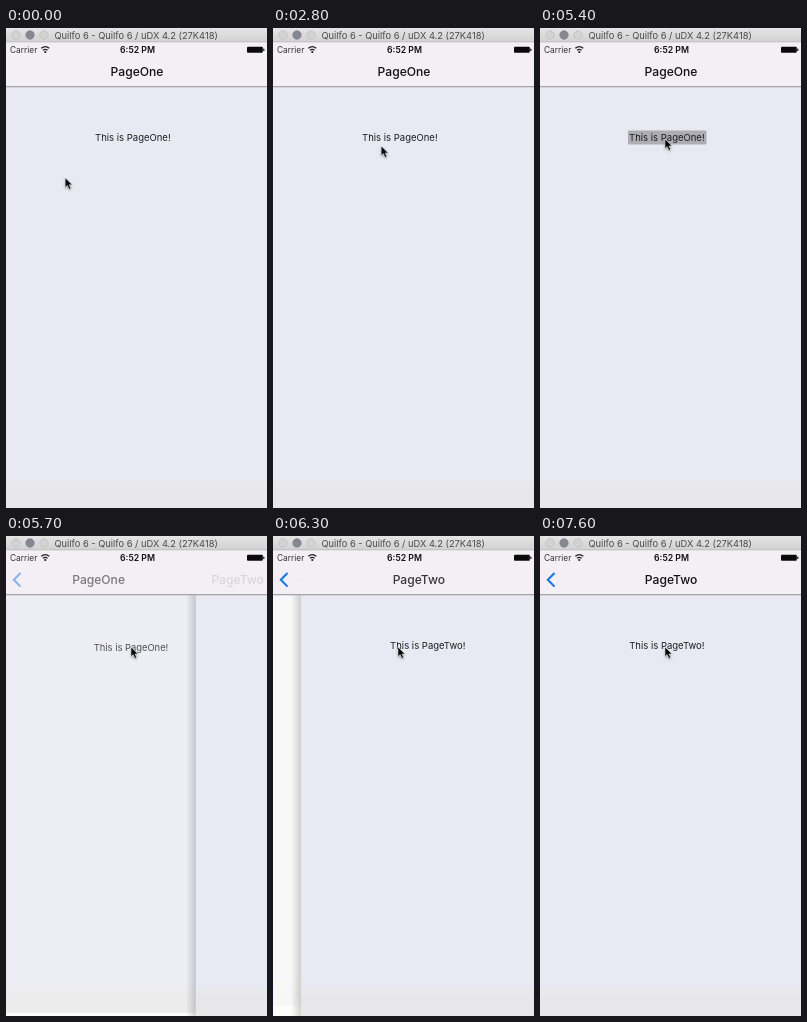
Recreate the animation shown at these times as an HTML page. Size 261 by 480 pixels, loop 8000 ms.

```html
<!DOCTYPE html>
<html lang="en">
<head>
<meta charset="utf-8">
<title>Page push</title>
<style>
  html, body { margin: 0; height: 100%; overflow: hidden; background: #fdfdfb; }
  svg { display: block; width: 100vw; height: 100vh; font-family: Inter, Roboto, sans-serif; }
  .label { font-size: 9.5px; fill: #1c1c20; }
  .title { font-size: 12.1px; font-weight: 500; text-anchor: middle; fill: #111; }
  #cursor { filter: drop-shadow(0 1px 1px rgba(0, 0, 0, .35)); }
</style>
</head>
<body>
<svg viewBox="0 0 261 480" preserveAspectRatio="none">
  <defs>
    <linearGradient id="chrome" x2="0" y2="1">
      <stop stop-color="#e6e5e6"/><stop offset="1" stop-color="#d2d1d2"/>
    </linearGradient>
    <linearGradient id="shade">
      <stop stop-color="#000" stop-opacity="0"/><stop offset="1" stop-color="#000" stop-opacity=".17"/>
    </linearGradient>
    <g id="sheet">
      <rect y="14" width="261" height="466" fill="#e9e9f3"/>
      <rect y="452" width="261" height="8" fill="#e9e9ec"/>
      <rect y="460" width="261" height="20" fill="#e7e7e9"/>
    </g>
  </defs>

  <rect width="261" height="480" fill="#fdfdfb"/>
  <g id="one">
    <use href="#sheet"/>
    <rect id="press" x="88" y="102.5" width="78.5" height="14" rx="1" fill="#adadb3"/>
    <text class="label" x="89" y="113">This is PageOne!</text>
  </g>
  <g id="two">
    <rect x="-10" y="59" width="10" height="421" fill="url(#shade)"/>
    <use href="#sheet"/>
    <text class="label" x="89" y="113">This is PageTwo!</text>
  </g>

  <rect y="14" width="261" height="44" fill="#f3eff4"/>
  <rect y="58" width="261" height="1.3" fill="#a6a5a9"/>
  <text id="titleOne" class="title" x="131" y="47.6">PageOne</text>
  <text id="titleTwo" class="title" x="131" y="47.6">PageTwo</text>
  <path id="back" d="M14.5 37 7.8 43.8l6.700 6.800" fill="none" stroke="#0f74f6" stroke-width="2"/>

  <text x="4" y="24.700" font-size="8.4" fill="#333">Carrier</text>
  <g fill="none" stroke="#222" stroke-width="1.2">
    <path d="M35.300 20.300Q39.300 16.800 43.300 20.300M37 22.300Q39.300 20.300 41.600 22.300"/>
    <circle cx="39.300" cy="24" r=".5"/>
  </g>
  <text x="131.500" y="24.700" font-size="8.7" font-weight="600" text-anchor="middle" fill="#111">6:52 PM</text>
  <rect x="241" y="18.800" width="15.800" height="6" rx="1" fill="#0a0a0a"/>
  <rect x="257.200" y="20.600" width="1.200" height="2.400" rx=".5" fill="#0a0a0a"/>

  <rect width="261" height="14" fill="url(#chrome)"/>
  <rect y="13.500" width="261" height=".8" fill="#b9b8ba"/>
  <g fill="#d4d3d4" stroke="#bfbebf" stroke-width=".7">
    <circle cx="10" cy="7" r="4.200"/>
    <circle cx="24" cy="7" r="4.200" fill="#858891" stroke="#7b7e87"/>
    <circle cx="38" cy="7" r="4.200"/>
  </g>
  <text x="48.500" y="10.700" font-size="9.3" fill="#4a4a4a">Quilfo 6 - Quilfo 6 / uDX 4.2 (27K418)</text>

  <path id="cursor" d="M0 0V9.600L2.200 7.600 3.900 11.400 5.600 10.600 4 7H7Z" fill="#050505" stroke="#f4f4f6" stroke-width=".5"/>
</svg>
<script>
const $ = id => document.getElementById(id);
const LOOP = 8000, STEP = 100, W = 261;

// time, x, y of the pointer tip
const path = [
  [0, 59.2, 149.8], [1300, 59.2, 149.8], [1800, 70.8, 136], [2200, 90.2, 125],
  [3100, 117.2, 114.5], [3600, 121.2, 112], [3700, 121.2, 112], [4000, 125, 111], [LOOP, 125, 111]
];

function pointer(t) {
  const i = path.findIndex(k => k[0] > t);
  const [t0, x0, y0] = path[i - 1], [t1, x1, y1] = path[i];
  const f = (t - t0) / (t1 - t0);
  return [x0 + (x1 - x0) * f, y0 + (y1 - y0) * f];
}

// critically damped spring from 0 to 1
function spring(t) {
  if (t < 5600) return 0;
  const u = (t - 5479) * 0.004625;
  return 1 - (1 + u) * Math.exp(-u);
}

function place(id, transform, opacity = 1) {
  $(id).setAttribute('transform', transform);
  $(id).setAttribute('opacity', opacity);
}

function draw(t) {
  const p = spring(t), x = W * (1 - p), s = 1 - 0.05 * p;
  place('one', `translate(0 ${254 * (1 - s)}) scale(${s})`, 1 - 0.85 * p);
  place('two', `translate(${p ? x : W + 11} 0)`);
  place('titleOne', `translate(${-141 * p} 0)`, (1 - p) ** 2);
  place('titleTwo', `translate(${0.53 * x} 0)`, p ** 1.7);
  place('back', '', Math.min(1, p * 1.8));
  place('press', '', t >= 5400 && t < 5600 ? 1 : 0);
  place('cursor', `translate(${pointer(t)})`);
}

function tick(now) {
  draw(Math.floor(now % LOOP / STEP) * STEP);
  requestAnimationFrame(tick);
}
tick(performance.now());
</script>
</body>
</html>
```
